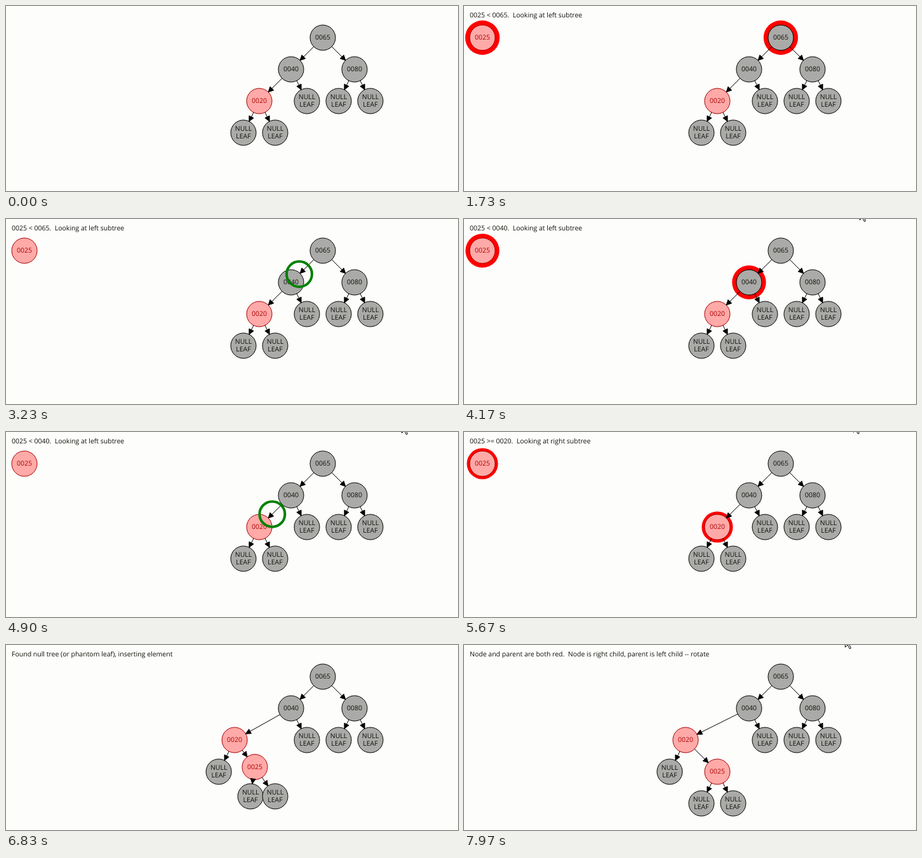
Recreate the animation shown at these times as an HTML page with a canvas. Size 712 by 292 pixels, loop 8000 ms.

```html
<!DOCTYPE html>
<html lang="en">
<head>
<meta charset="utf-8">
<title>Red-black tree insertion</title>
<style>
  html, body { margin: 0; width: 100%; height: 100%; overflow: hidden; background: #fdfdfc; }
  canvas { display: block; }
</style>
</head>
<body>
<canvas id="stage" width="712" height="292"></canvas>
<script>
const ctx = document.getElementById('stage').getContext('2d');
const LOOP = 8000, FPS = 30, RADIUS = 20, BLOCK = 27;

const BLACK = { fill: '#aaaaa8', line: '#000', text: '#101008' };
const RED = { fill: '#ffaaa8', line: '#aa0000', text: '#aa0000' };

// Steps of the insertion, in ticks of 1/30 s
const STEPS = [
  { at: 0, text: '' },
  { at: 27, text: 'Inserting 0025' },
  { at: 52, text: '0025 < 0065.  Looking at left subtree', glow: 'root' },
  { at: 77, text: '0025 < 0065.  Looking at left subtree', ring: ['root', 'n40'] },
  { at: 104, text: '0025 < 0040.  Looking at left subtree', glow: 'n40' },
  { at: 131, text: '0025 < 0040.  Looking at left subtree', ring: ['n40', 'n20'] },
  { at: 157, text: '0025 >= 0020.  Looking at right subtree', glow: 'n20' },
  { at: 184, text: 'Found null tree (or phantom leaf), inserting element', linked: true },
  { at: 236, text: 'Node and parent are both red.  Node is right child, parent is left child -- rotate', linked: true }
];
const ENTER = 27, LINK = 184;

// Pointer tip: time, x, y; only its lower end reaches the stage
const POINTER = [
  [[3600, 623, -17], [4170, 623, -15], [5350, 623, -15], [5670, 613, -16],
   [5930, 613, -16], [6370, 570, -16], [6640, 560, -20]],
  [[7800, 614, -17], [7970, 600, -13], [8000, 599, -13]]
];

const mix = (a, b, p) => a + (b - a) * p;
const clamp = v => Math.max(0, Math.min(1, v));
const node = (x, y, label, color = BLACK) => ({ x, y, label, color });
const leaf = (x, y) => node(x, y, null);

// The new node is pulled to its first slot and then to its resized slot on every tick
function newNodePlace(ticks) {
  let x = 29, y = 50;
  for (let i = 0; i < Math.min(ticks, BLOCK); i++) {
    const p = 1 / (BLOCK - i);
    x = mix(mix(x, 424, p), 399, p);
    y = mix(mix(y, 200, p), 200, p);
  }
  return [x, y];
}

function buildTree(tick, linked) {
  const p = clamp((tick - LINK) / BLOCK), shift = 50 * p;
  const nodes = {
    root: node(499, 50, '0065'),
    n40: node(449, 100, '0040'),
    n80: node(549, 100, '0080'),
    leaf40: leaf(474, 150),
    leaf80l: leaf(524, 150),
    leaf80r: leaf(574, 150),
    n20: node(399 - shift, 150, '0020', RED),
    leaf20l: leaf(374 - shift, 200)
  };
  const edges = [['root', 'n40'], ['root', 'n80'], ['n40', 'n20'], ['n40', 'leaf40'],
    ['n80', 'leaf80l'], ['n80', 'leaf80r'], ['n20', 'leaf20l']];
  if (linked) {
    nodes.leaf25l = leaf(424 - shift, 200 + shift);
    nodes.leaf25r = leaf(424, 200 + shift);
    edges.push(['n20', 'n25'], ['n25', 'leaf25l'], ['n25', 'leaf25r']);
  } else {
    nodes.leaf20r = leaf(424, 200);
    edges.push(['n20', 'leaf20r']);
  }
  if (tick >= ENTER) nodes.n25 = node(...newNodePlace(tick - LINK), '0025', RED);
  return { nodes, edges };
}

function disc(x, y, r) {
  ctx.beginPath();
  ctx.arc(x, y, r, 0, Math.PI * 2);
}

function drawNode({ x, y, label, color }, glow) {
  if (glow) {
    disc(x, y, RADIUS + glow);
    ctx.fillStyle = '#f00';
    ctx.fill();
  }
  disc(x, y, RADIUS);
  ctx.fillStyle = color.fill;
  ctx.strokeStyle = color.line;
  ctx.lineWidth = 1;
  ctx.fill();
  ctx.stroke();
  ctx.fillStyle = color.text;
  ctx.textAlign = 'center';
  if (label) ctx.fillText(label, x, y + 3);
  else {
    ctx.fillText('NULL', x, y - 3);
    ctx.fillText('LEAF', x, y + 9);
  }
}

function drawEdge(a, b) {
  const length = Math.hypot(b.x - a.x, b.y - a.y);
  const ux = (b.x - a.x) / length, uy = (b.y - a.y) / length;
  const tipX = b.x - ux * RADIUS, tipY = b.y - uy * RADIUS;
  ctx.strokeStyle = ctx.fillStyle = '#000';
  ctx.lineWidth = 1;
  ctx.beginPath();
  ctx.moveTo(a.x + ux * RADIUS, a.y + uy * RADIUS);
  ctx.lineTo(tipX, tipY);
  ctx.stroke();
  ctx.beginPath();
  ctx.moveTo(tipX, tipY);
  for (const side of [4, -4]) ctx.lineTo(tipX - ux * 8 + uy * side, tipY - uy * 8 - ux * side);
  ctx.closePath();
  ctx.fill();
  ctx.stroke();
}

function drawRing(a, b, p) {
  disc(mix(a.x, b.x, p), mix(a.y, b.y, p), RADIUS);
  ctx.strokeStyle = '#008000';
  ctx.lineWidth = 4;
  ctx.stroke();
}

function drawPointer(time) {
  const track = POINTER.find(t => time >= t[0][0] && time < t[t.length - 1][0]);
  if (!track) return;
  const i = track.findIndex(k => k[0] > time);
  const [t0, x0, y0] = track[i - 1], [t1, x1, y1] = track[i];
  const p = (time - t0) / (t1 - t0);
  ctx.save();
  ctx.translate(mix(x0, x1, p) + .5, mix(y0, y1, p) + .5);
  const shape = new Path2D('M0 0V16L4 12.5L7 18.5L9 17.5L6.3 11.5H11Z');
  ctx.fillStyle = '#fff';
  ctx.strokeStyle = '#000';
  ctx.lineWidth = 1;
  ctx.fill(shape);
  ctx.stroke(shape);
  ctx.restore();
}

function draw(time) {
  const tick = Math.floor((time + 5) * FPS / 1000);
  const step = STEPS.filter(s => s.at <= tick).pop();
  const { nodes, edges } = buildTree(tick, step.linked);
  const pulse = 3 + 5 * Math.abs((tick + 2.8) / 7 % 2 - 1);

  ctx.fillStyle = '#fdfdfc';
  ctx.fillRect(0, 0, 712, 292);
  ctx.font = '10.5px "Open Sans", "Noto Sans", sans-serif';
  ctx.textRendering = 'geometricPrecision';

  for (const [id, n] of Object.entries(nodes)) {
    const lit = step.glow && (id === step.glow || id === 'n25');
    drawNode(n, lit ? pulse : 0);
  }
  for (const [from, to] of edges) drawEdge(nodes[from], nodes[to]);
  if (step.ring) {
    const [from, to] = step.ring;
    drawRing(nodes[from], nodes[to], clamp((tick - step.at) / BLOCK));
  }
  ctx.textAlign = 'left';
  ctx.fillStyle = '#101008';
  ctx.fillText(step.text, 9, 18);
  drawPointer(time);
}

function play() {
  draw(performance.now() % LOOP);
  requestAnimationFrame(play);
}
play();
</script>
</body>
</html>
```
